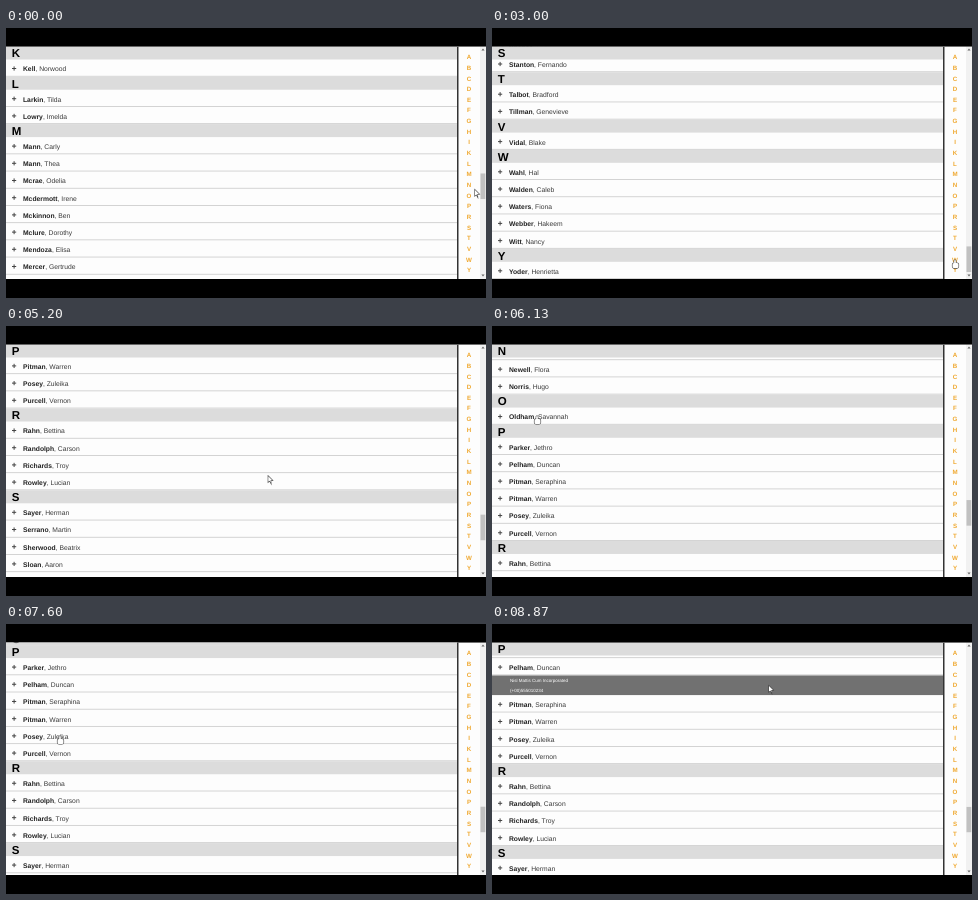
Recreate the animation shown at these times as an HTML page with a canvas. Size 480x270 px, loop 9140 ms.

```html
<!DOCTYPE html>
<html lang="en">
<head>
<meta charset="utf-8">
<title>Contact list</title>
<style>
  html, body { margin: 0; width: 100%; height: 100%; overflow: hidden; background: #000; }
  canvas { display: block; width: 480px; height: 270px; }
</style>
</head>
<body>
<canvas id="stage" width="480" height="270"></canvas>
<script>
const ctx = document.getElementById('stage').getContext('2d');
ctx.textRendering = 'geometricPrecision';

const LOOP = 9140;
const TOP = 18.5, BOTTOM = 251, VIEW = BOTTOM - TOP;
const LIST_W = 451, ROW = 17.2, HEAD = 13, PANEL = 20;
const HIDDEN = 1086; // height of the sections above K, which never come into view
const LETTERS = 'ABCDEFGHIKLMNOPRSTVWY';
const FONT = '"Liberation Sans", Arial, sans-serif';

const sections = Object.entries({
  K: 'Kell, Norwood',
  L: 'Larkin, Tilda|Lowry, Imelda',
  M: 'Mann, Carly|Mann, Thea|Mcrae, Odelia|Mcdermott, Irene|Mckinnon, Ben|Mclure, Dorothy|' +
     'Mendoza, Elisa|Mercer, Gertrude|Mosley, Adele',
  N: 'Nash, Oscar|Newell, Flora|Norris, Hugo',
  O: 'Oldham, Savannah',
  P: 'Parker, Jethro|Pelham, Duncan|Pitman, Seraphina|Pitman, Warren|Posey, Zuleika|Purcell, Vernon',
  R: 'Rahn, Bettina|Randolph, Carson|Richards, Troy|Rowley, Lucian',
  S: 'Sayer, Herman|Serrano, Martin|Sherwood, Beatrix|Sloan, Aaron|Snow, Felix|Soto, Marina|' +
     'Spence, Ruth|Stanton, Fernando',
  T: 'Talbot, Bradford|Tillman, Genevieve',
  V: 'Vidal, Blake',
  W: 'Wahl, Hal|Walden, Caleb|Waters, Fiona|Webber, Hakeem|Witt, Nancy',
  Y: 'Yoder, Henrietta'
}).map(([letter, names]) => ({ letter, rows: names.split('|').map(n => n.split(', ')) }));

const details = {
  Oldham: ['Ut Foundation', '(+00)555010187'],
  Pelham: ['Nisl Mattis Cum Incorporated', '(+00)555010234']
};

// Positions in the list while every panel is closed.
const offsets = {};
let listEnd = 0;
for (const { letter, rows } of sections) {
  offsets[letter] = listEnd;
  listEnd += HEAD;
  for (const [last] of rows) {
    offsets[last] = listEnd;
    listEnd += ROW;
  }
}

const swing = p => 0.5 - Math.cos(p * Math.PI) / 2;
const coast = p => 1 - (1 - p) ** 1.5;

// Moves are [from, to, target, ease]; a move without duration is a hard jump.
function follow(value, moves, t) {
  for (const [from, to, target, ease = swing] of moves) {
    if (t < from) break;
    value += (target - value) * (t < to ? ease((t - from) / (to - from)) : 1);
  }
  return value;
}

const reveal = name => offsets[name] - HEAD - 2.6;
const scrollMoves = [
  [800, 800, offsets.P],
  [2670, 2670, listEnd - VIEW],
  [4730, 5630, offsets.Oldham - 63.4, coast],
  [6110, 6500, reveal('Oldham')],
  [7270, 7800, reveal('Pelham')]
];
const panelMoves = {
  Oldham: [[6450, 6950, PANEL], [7270, 7700, 0]],
  Pelham: [[7820, 8320, PANEL]]
};

const indexY = letter => 29 + LETTERS.indexOf(letter) * 10.65;
const onIndex = letter => [463, indexY(letter) - 2];
const pointerStart = [469, 162];
const pointerMoves = [
  [70, 600, onIndex('P')],
  [800, 1200, onIndex('S')],
  [1930, 2530, onIndex('Y')],
  [2950, 3200, [463, 160]],
  [3420, 4070, [265, 151]],
  [5150, 5870, [45, 90]],
  [7000, 7250, [54, 112]],
  [8150, 8870, [277, 62]]
];
const pointerAt = (axis, t) =>
  follow(pointerStart[axis], pointerMoves.map(([a, b, spot]) => [a, b, spot[axis]]), t);

function box(color, x, y, w, h) {
  ctx.fillStyle = color;
  ctx.fillRect(x, y, w, h);
}

function text(str, x, y, size, color, weight = 'normal', align = 'left') {
  ctx.font = `${weight} ${size}px ${FONT}`;
  ctx.fillStyle = color;
  ctx.textAlign = align;
  ctx.fillText(str, x, y);
  return ctx.measureText(str).width;
}

function clipped(x, y, w, h, draw) {
  ctx.save();
  ctx.beginPath();
  ctx.rect(x, y, w, h);
  ctx.clip();
  draw();
  ctx.restore();
}

function drawRow([last, first], y) {
  box('#444', 6, y + 8.5, 4.2, 1);
  box('#444', 7.6, y + 6.9, 1, 4.2);
  const base = y + 11.9;
  const w = text(last, 17, base, 6.75, '#222', 'bold');
  text(', ' + first, 17 + w, base, 6.75, '#3a3a3a');
  box('#cfcfcf', 0, y + ROW - 0.9, LIST_W, 0.9);
}

function drawPanel(lines, y, h) {
  clipped(0, y, LIST_W, h, () => {
    box('#717171', 0, y, LIST_W, h);
    lines.forEach((line, i) => text(line, 18, y + 6.8 + i * 9.6, 4.5, '#fff'));
  });
}

function drawList(scroll, t) {
  let y = TOP - scroll;
  for (const { letter, rows } of sections) {
    const start = y;
    y += HEAD;
    for (const row of rows) {
      drawRow(row, y);
      y += ROW;
      const h = follow(0, panelMoves[row[0]] || [], t);
      if (h > 0) drawPanel(details[row[0]], y, h);
      y += h;
    }
    // The current heading sticks to the top until the next one pushes it out.
    const headY = Math.min(Math.max(start, TOP), y - HEAD);
    box('#dcdcdc', 0, headY, LIST_W, HEAD);
    text(letter, 5.7, headY + 10.9, 11.5, '#000', 'bold');
  }
  return y + scroll - TOP;
}

function drawIndex() {
  box('#fdfdfd', LIST_W, TOP, 23, VIEW);
  box('#333', LIST_W, TOP, 1.5, VIEW);
  for (const c of LETTERS) text(c, 463, indexY(c) + 2.2, 6.2, '#efa82f', 'bold', 'center');
}

function drawTriangle(x, y, dir) {
  ctx.beginPath();
  ctx.moveTo(x, y - dir);
  ctx.lineTo(x + 1.6, y + dir);
  ctx.lineTo(x - 1.6, y + dir);
  ctx.fillStyle = '#666';
  ctx.fill();
}

function drawScrollbar(scroll, height) {
  const scale = 218 / (HIDDEN + height);
  box('#f1f1f1', 474, TOP, 6, VIEW);
  box('#c1c1c1', 474.5, 26 + (HIDDEN + scroll) * scale, 4.8, VIEW * scale);
  drawTriangle(477, 21.5, 1);
  drawTriangle(477, 247.5, -1);
}

function drawPointer(x, y) {
  const overLink = x < 80 || (x > 456 && x < 467);
  ctx.save();
  ctx.translate(x, y);
  ctx.beginPath();
  if (overLink) {
    ctx.roundRect(-2.5, 3, 6, 5, 1.5);
    ctx.roundRect(-0.8, 0, 1.6, 5, 0.8);
  } else {
    ctx.moveTo(0, 0);
    ctx.lineTo(0, 5.6);
    ctx.lineTo(1.4, 4.4);
    ctx.lineTo(2.5, 6.4);
    ctx.lineTo(2.3, 4.1);
    ctx.lineTo(4, 4);
    ctx.closePath();
  }
  ctx.strokeStyle = '#444';
  ctx.lineWidth = 1.2;
  ctx.stroke();
  ctx.fillStyle = '#fff';
  ctx.fill();
  ctx.restore();
}

function draw(t) {
  const scroll = follow(0, scrollMoves, t);
  box('#000', 0, 0, 480, 270);
  clipped(0, TOP, 480, VIEW, () => {
    box('#fdfdfd', 0, TOP, 480, VIEW);
    const height = drawList(scroll, t);
    drawIndex();
    drawScrollbar(scroll, height);
    drawPointer(pointerAt(0, t), pointerAt(1, t));
  });
}

const begin = performance.now();
function frame() {
  draw((performance.now() - begin) % LOOP);
  requestAnimationFrame(frame);
}
frame();
</script>
</body>
</html>
```
